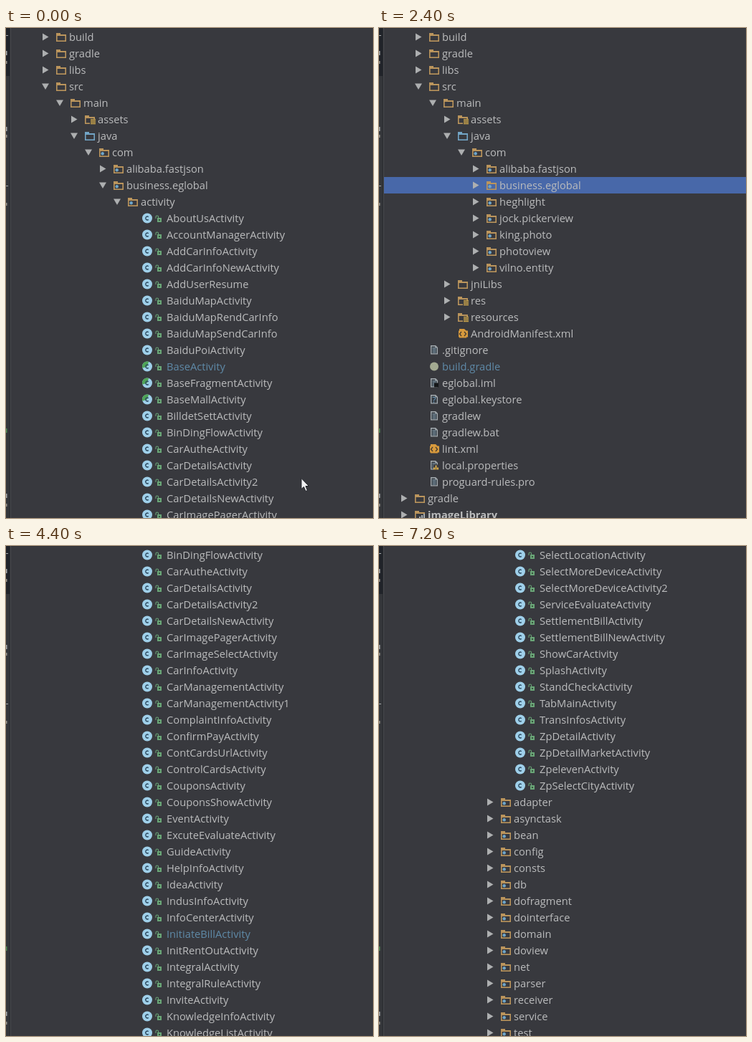
Animation, 512 px wide and 684 px high, one loop 7.6 s. Source, as an HTML page with a canvas:

```html
<!DOCTYPE html>
<html lang="en">
<head>
<meta charset="utf-8">
<title>Project tree</title>
<style>
html, body { margin: 0; width: 100%; height: 100%; overflow: hidden; background: #38393e; }
canvas { display: block; }
</style>
</head>
<body>
<canvas id="stage" width="512" height="684"></canvas>
<script>
const ctx = document.getElementById('stage').getContext('2d');
const W = 512, H = 684, ROW = 23, LOOP = 7600, SELECTED = 9;
const C = {
  bg: '#38393e', text: '#bbbcbd', link: '#5f8aa8', select: '#4868a9', arrow: '#adafb0',
  folder: '#bb955c', source: '#72a5c6', dot: '#6ea6ca', yellow: '#d8ad4b', cls: '#9fd0ea',
  ink: '#2c4a60', green: '#6aa577', doc: '#a4abb0', orange: '#d79a3d'
};
const LINKS = new Set(['BaseActivity', 'InitiateBillActivity', 'OrderToPayActivity',
  'PingppUseActivity', 'build.gradle']);

const words = s => s.trim().split(/\s+/);
const node = (name, depth, icon = 'folder', arrow = 'right') => ({ name, depth, icon, arrow });
const file = (name, icon = 'doc', depth = 0) => node(name, depth, icon, '');
const packages = (names, depth) => words(names).map(n => node(n, depth, 'package'));

const head = [
  ...words('build gradle libs').map(n => node(n, 0)),
  node('src', 0, 'folder', 'down'),
  node('main', 1, 'folder', 'down'),
  node('assets', 2, 'resource'),
  node('java', 2, 'source', 'down'),
  node('com', 3, 'package', 'down'),
  node('alibaba.fastjson', 4, 'package')
];

const classes = words(`
  AboutUsActivity AccountManagerActivity AddCarInfoActivity AddCarInfoNewActivity AddUserResume
  BaiduMapActivity BaiduMapRendCarInfo BaiduMapSendCarInfo BaiduPoiActivity BaseActivity
  BaseFragmentActivity BaseMallActivity BilldetSettActivity BinDingFlowActivity CarAutheActivity
  CarDetailsActivity CarDetailsActivity2 CarDetailsNewActivity CarImagePagerActivity
  CarImageSelectActivity CarInfoActivity CarManagementActivity CarManagementActivity1
  ComplaintInfoActivity ConfirmPayActivity ContCardsUrlActivity ControlCardsActivity
  CouponsActivity CouponsShowActivity EventActivity ExcuteEvaluateActivity GuideActivity
  HelpInfoActivity IdeaActivity IndusInfoActivity InfoCenterActivity InitiateBillActivity
  InitRentOutActivity IntegralActivity IntegralRuleActivity InviteActivity KnowledgeInfoActivity
  KnowledgeListActivity LoginActivity MainActivity MapSearchActivity MyCollectionActivity
  MyRecruitmentInfoActivity MyWalletActivity NeedServiceActivity NewMainPageActivity
  NoNetActivity OrderToPayActivity PartsBillInfoActivity PartsFrontUrlActivity PartsWebActivity
  PayDetailActivity PayMessageActivity PayUseCouponsActivity PayUseCouponsActivity2
  PendingBillActivity PersonalInfoActivity PingppTestActivity PingppUseActivity
  PointManagementActivity PubActivity RecruitmentAndJobList RegisterActivity
  RegisterProtocolActivity RendCarActivity RendCarInfoActivity RentActivity RentDetailActivity
  RentOrderDetailActivity RentPayActivity RentServiceActivity RentWantedCarActivity
  ResumeJobInfoActivity RetrivePasswordActivity SearchActivity SelectAddressActivity
  SelectBrandActivity SelectCarRecruitmentActivity SelectCityActivity SelectJobActivity
  SelectLocationActivity SelectMoreDeviceActivity SelectMoreDeviceActivity2
  ServiceEvaluateActivity SettlementBillActivity SettlementBillNewActivity ShowCarActivity
  SplashActivity StandCheckActivity TabMainActivity TransInfosActivity ZpDetailActivity
  ZpDetailMarketActivity ZpelevenActivity ZpSelectCityActivity`);

const expanded = [
  ...head,
  node('business.eglobal', 4, 'package', 'down'),
  node('activity', 5, 'package', 'down'),
  ...classes.map(n => node(n, 6, n.startsWith('Base') ? 'abstract' : 'class', '')),
  ...packages(`adapter asynctask bean config consts db dofragment dointerface domain doview
    net parser receiver service test`, 5)
];

const collapsed = [
  ...head,
  ...packages('business.eglobal heghlight jock.pickerview king.photo photoview vilno.entity', 4),
  node('jniLibs', 2), node('res', 2, 'resource'), node('resources', 2, 'resource'),
  file('AndroidManifest.xml', 'xml', 2),
  file('.gitignore'), file('build.gradle', 'script'), file('eglobal.iml', 'module'),
  file('eglobal.keystore', 'unknown'), file('gradlew'), file('gradlew.bat'),
  file('lint.xml', 'xml'), file('local.properties', 'bars'), file('proguard-rules.pro'),
  node('gradle', -1), node('imageLibrary', -1, 'library')
];

function rect(color, x, y, w, h) {
  ctx.fillStyle = color;
  ctx.fillRect(x, y, w, h);
}

function shape(color, points) {
  ctx.fillStyle = color;
  ctx.beginPath();
  points.forEach(([x, y]) => ctx.lineTo(x, y));
  ctx.closePath();
  ctx.fill();
}

function disc(color, x, y, r) {
  ctx.fillStyle = color;
  ctx.beginPath();
  ctx.arc(x, y, r, 0, 7);
  ctx.fill();
}

function label(text, x, y, color, font) {
  ctx.fillStyle = color;
  ctx.font = font;
  ctx.fillText(text, x, y);
}

function drawArrow(x, y, dir) {
  shape(C.arrow, dir === 'down'
    ? [[x - 5, y - 4], [x + 5, y - 4], [x, y + 4.5]]
    : [[x - 4, y - 5], [x + 4.5, y], [x - 4, y + 5]]);
}

function drawFolder(x, y, icon, back) {
  const color = icon === 'source' ? C.source : C.folder;
  rect(color, x, y - 6, 6, 3);
  rect(color, x, y - 4, 14, 10);
  rect(back, x + 1.6, y - 2, 10.8, 6.4);
  if (icon === 'package') disc(C.dot, x + 4.7, y + 1.2, 2.2);
  if (icon === 'resource') {
    rect(back, x + 7, y - 1, 8, 8);
    for (let i = 0; i < 4; i++) rect(C.yellow, x + 8, y - 1 + i * 2, 7, 1.2);
  }
  if (icon === 'library') {
    rect(back, x + 5, y - 1, 10, 8);
    for (let i = 0; i < 3; i++) rect(C.doc, x + 6 + i * 3, y + 2 - i * 2, 2, 5 + i * 2);
  }
}

function drawClass(x, y, abstract) {
  disc(C.cls, x, y, 7);
  if (abstract) {
    ctx.fillStyle = '#4fa457';
    ctx.beginPath();
    ctx.moveTo(x, y);
    ctx.arc(x, y, 7, Math.PI * 0.9, Math.PI * 1.6);
    ctx.fill();
  }
  ctx.strokeStyle = C.ink;
  ctx.lineWidth = 1.3;
  ctx.beginPath();
  ctx.arc(x + 0.2, y, 2.4, 0.9, 5.4);
  ctx.stroke();
}

function drawLock(x, y) {
  ctx.strokeStyle = C.green;
  ctx.lineWidth = 1.1;
  ctx.beginPath();
  ctx.moveTo(x - 4, y);
  ctx.lineTo(x - 4, y - 2);
  ctx.arc(x - 2.2, y - 2.2, 1.8, Math.PI, 0);
  ctx.lineTo(x - 0.4, y);
  ctx.stroke();
  rect(C.green, x - 2, y - 1, 6, 6);
  rect('#2c4032', x + 0.2, y + 1, 1.6, 2);
}

function drawFile(x, y, icon) {
  if (icon === 'script') return disc('#a3aa91', x, y, 6);
  const color = icon === 'xml' ? C.orange : C.doc;
  shape(color, [[x - 5, y - 6.5], [x + 2, y - 6.5], [x + 5, y - 3.5], [x + 5, y + 6], [x - 5, y + 6]]);
  if (icon === 'xml') {
    rect(C.orange, x - 6, y - 4, 13, 9);
    ctx.strokeStyle = '#443b30';
    ctx.lineWidth = 1.3;
    for (const s of [-1, 1]) {
      ctx.beginPath();
      ctx.moveTo(x + s * 2, y - 2.5);
      ctx.lineTo(x + s * 4.5, y + 0.5);
      ctx.lineTo(x + s * 2, y + 3.5);
      ctx.stroke();
    }
    return;
  }
  rect('#363c43', x - 3.7, y - 5, 5, 2);
  rect('#363c43', x - 3.7, y - 3, 7.4, 7.8);
  if (icon === 'unknown') return label('?', x - 2.5, y + 4.5, '#70a6ce', '11px "Open Sans", sans-serif');
  for (let i = 0; i < 4; i++) rect('#819cae', x - 2.5, y - 3 + i * 2, 5, 1);
  if (icon === 'module') rect('#151719', x, y, 6, 6);
  if (icon === 'bars') {
    rect(C.bg, x - 1, y - 1, 8, 8);
    for (let i = 0; i < 3; i++) rect(C.yellow, x - 1 + i * 2.5, y + 3 - (i % 2) * 3, 2, 3 + (i % 2) * 3);
  }
}

function drawRow(item, top, selected) {
  const y = top + 11.5, x = 70 + item.depth * 20;
  const isClass = item.depth === 6;
  if (selected) rect(C.select, 7, top, W - 7, ROW);
  if (item.arrow) {
    drawArrow(x - 15, y, item.arrow);
    drawFolder(x, Math.round(y), item.icon, selected ? C.select : C.bg);
  } else if (isClass) {
    drawClass(197, y, item.icon === 'abstract');
    drawLock(213, y + 0.5);
  } else {
    drawFile(x + 7, y, item.icon);
  }
  const weight = item.icon === 'library' ? 'bold ' : '';
  label(item.name, isClass ? 224 : x + 18, y + 5.5,
    LINKS.has(item.name) ? C.link : C.text,
    weight + '14.7px "Open Sans", "Noto Sans", sans-serif');
}

function drawEdge() {
  rect('#34363a', 0, 0, 6, H);
  rect('#202329', 0, 0, 5, 67);
  rect('#292b2f', 5, 0, 1, H);
  rect('#484a4e', 6, 0, 1, H);
  for (const y of [10, 220]) rect('#a7aaab', 0, y, 3, 1);
  for (const y of [32, 138, 650]) rect('#a7aaab', 0, y, 1.5, 6);
  for (const y of [46, 149, 244, 664]) rect('#96918a', 0, y, 1.5, 4);
  rect('#4d8a52', 0, 559, 1.5, 6);
}

function drawPointer(x, y) {
  const points = [[0, 0], [0, 15], [3.5, 12], [6, 18], [8.5, 17], [6, 11], [10.5, 11]];
  shape('#f2f3f4', points.map(([px, py]) => [x + px, y + py]));
  ctx.strokeStyle = '#22242a';
  ctx.lineWidth = 1;
  ctx.stroke();
}

function render(t) {
  const isCollapsed = t >= 400 && t < 3200;
  const rows = isCollapsed ? collapsed : expanded;
  // The list jumps 18 rows every 400 ms once scrolling starts.
  const scroll = t < 4000 ? 0 : 6 + 18 * Math.min(5, Math.floor((t - 4000) / 400));
  rect(C.bg, 0, 0, W, H);
  rows.slice(scroll, scroll + 30).forEach((item, i) =>
    drawRow(item, 1 + i * ROW, t >= 400 && i + scroll === SELECTED));
  rect('#2f3135', 7, 0, W - 7, 1);
  drawEdge();
  if (t < 400) drawPointer(412, 628.5);
}

function tick() {
  render(performance.now() % LOOP);
  requestAnimationFrame(tick);
}
tick();
</script>
</body>
</html>
```
